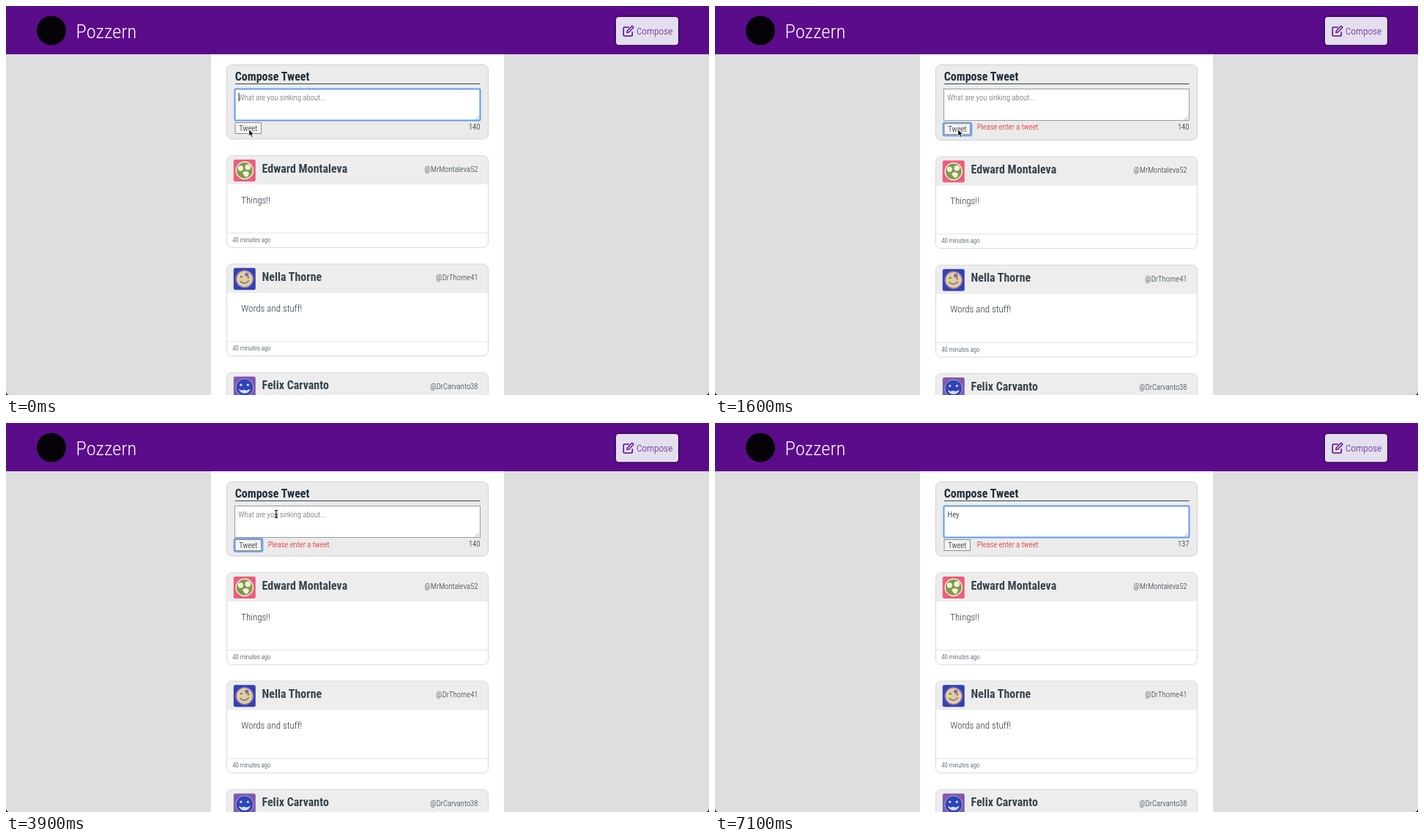
Animation of 960 by 532 pixels, one loop 7200 ms. Source, as an HTML page:

```html
<!DOCTYPE html>
<html lang="en">
<head>
<meta charset="utf-8">
<title>Pozzern</title>
<style>
  html, body { margin: 0; width: 100%; height: 100%; overflow: hidden; background: #dedede; }
  svg { display: block; width: 960px; height: 532px; }
  text { font-family: "Roboto Condensed", Roboto, sans-serif; font-stretch: 75%; font-weight: 350; white-space: pre; }
  text.wide { font-family: Roboto, sans-serif; font-stretch: 100%; }
  .bold { font-weight: 700; }
  .reg { font-weight: 400; }
  .raised { filter: drop-shadow(0 0.5px 1.5px #000); }
</style>
</head>
<body>
<svg id="stage" viewBox="0 0 960 532" xmlns="http://www.w3.org/2000/svg"></svg>
<script>
const NS = 'http://www.w3.org/2000/svg';
const stage = document.getElementById('stage');
const LOOP = 7200, STEP = 100;
const INK = '#36454f', DARK = '#25333e', PURPLE = '#5b0c8b', BLUE = '#5e9ced';

function add(parent, tag, attrs) {
  const el = document.createElementNS(NS, tag);
  for (const key in attrs) el.setAttribute(key, attrs[key]);
  parent.appendChild(el);
  return el;
}
const group = (parent, attrs = {}) => add(parent, 'g', attrs);
const rect = (parent, x, y, width, height, fill, more = {}) =>
  add(parent, 'rect', { x, y, width, height, fill, ...more });
const circle = (parent, cx, cy, r, fill, more = {}) =>
  add(parent, 'circle', { cx, cy, r, fill, ...more });
const path = (parent, d, fill, more = {}) => add(parent, 'path', { d, fill, ...more });

// Narrow the plain face only when no condensed face is installed.
function condenseRatio() {
  const width = cls => {
    const el = add(stage, 'text', { class: cls, 'font-size': 40 });
    el.textContent = 'Condensed sample';
    const w = el.getComputedTextLength();
    el.remove();
    return w;
  };
  return width('') / width('wide') > 0.95 ? 0.88 : 1;
}
const narrow = condenseRatio();

function text(parent, str, x, y, size, fill, cls = '', anchor = 'start') {
  const el = add(parent, 'text', {
    transform: `translate(${x} ${y}) scale(${narrow} 1)`,
    'font-size': size, fill, class: cls, 'text-anchor': anchor
  });
  el.textContent = str;
  return el;
}
const show = (el, on) => el.setAttribute('visibility', on ? 'visible' : 'hidden');
const move = (el, x, y) => el.setAttribute('transform', `translate(${x} ${y})`);

// Page
rect(stage, 0, 0, 960, 532, '#dedede');
rect(stage, 280, 66, 400, 466, '#fff');

// Compose form
const card = rect(stage, 301.5, 80.5, 357, 101.5, '#ebebeb', { rx: 7, stroke: '#d0d0d0' });
text(stage, 'Compose Tweet', 312.7, 102.3, 16, '#1f2c39', 'bold');
rect(stage, 313, 106, 334.5, 1, '#36454f');
rect(stage, 312.5, 113.5, 335, 43, '#fff', { stroke: '#9a9a9a' });
const boxRing = rect(stage, 312.5, 113.5, 335, 43, 'none', { stroke: BLUE, 'stroke-width': 2, rx: 1 });
path(stage, 'M641 155.5l5-5M644 155.5l2-2', 'none', { stroke: '#777', 'stroke-width': 0.7 });
const hint = text(stage, 'What are you sinking about...', 317.3, 128.5, 10.67, '#5c5c5c');
const typed = text(stage, '', 317.6, 128.5, 10.67, '#000');
const caret = rect(stage, 0, 118.5, 0.9, 12, '#111');

const button = group(stage);
const buttonRing = rect(button, 312, 158.6, 38, 17, 'none', { stroke: '#78a9ea', 'stroke-width': 3, rx: 2 });
rect(button, 313, 159.5, 35.5, 15, '#f3f3f3', { stroke: '#858585', 'stroke-width': 0.9 });
text(button, 'Tweet', 318.2, 170.6, 10.67, '#111');

const clip = add(add(stage, 'clipPath', { id: 'slide' }), 'rect', { x: 350, y: 160, width: 110, height: 0 });
const errorBox = group(stage, { 'clip-path': 'url(#slide)' });
const error = group(errorBox);
text(error, 'Please enter a tweet', 357.8, 0, 10.67, '#e00d15');
const count = text(stage, '140', 647.5, 169.3, 10.67, '#111', '', 'end');

// Feed
const faces = [
  g => {
    rect(g, 0, 0, 30, 30, '#ee5c7c', { rx: 2.5 });
    circle(g, 15, 15, 12.3, '#f4f0dc');
    circle(g, 15, 15, 10.8, '#7f9a4b');
    circle(g, 9.5, 12, 3.6, '#f4f0dc');
    circle(g, 19.5, 10.5, 3.8, '#f4f0dc');
    path(g, 'M12 18q5-4 9 0q0 5-4 6q-3-2-5-6z', '#f4f0dc');
  },
  g => {
    rect(g, 0, 0, 30, 30, '#3440b4', { rx: 2.5 });
    circle(g, 15, 15, 11.6, '#dfcf9b', { stroke: '#8a74b4', 'stroke-width': 1.6 });
    circle(g, 10.5, 12, 1.3, '#6d5a86');
    circle(g, 18, 9, 2.6, '#8a64ad');
    circle(g, 20, 13, 1.2, '#6d5a86');
    path(g, 'M9 18q6 6 12-1', 'none', { stroke: '#6d5a86', 'stroke-width': 1.3 });
  },
  g => {
    rect(g, 0, 0, 30, 30, '#8258ae', { rx: 2.5 });
    circle(g, 15, 15, 12, '#2c45b7', { stroke: '#b9a5d4', 'stroke-width': 1 });
    circle(g, 10, 11.5, 1.6, '#d9dcf2');
    circle(g, 19.5, 11.5, 1.6, '#d9dcf2');
    path(g, 'M7 17l4 2 3-1 4 1 5-2q-2 6-8 6t-8-6z', '#d9dcf2');
  }
];
const feed = group(stage);
const posts = [
  ['Edward Montaleva', '@MrMontaleva52', 'Things!!'],
  ['Nella Thorne', '@DrThorne41', 'Words and stuff!'],
  ['Felix Carvanto', '@DrCarvanto38', '']
];
posts.forEach(([name, handle, body], i) => {
  const g = group(feed, { transform: `translate(0 ${204.5 + i * 148.4})` });
  rect(g, 301.5, 0, 357, 125.8, '#fff', { rx: 7 });
  path(g, 'M301.5 39.5V7q0-7 7-7h343q7 0 7 7v32.5z', '#ededed');
  rect(g, 302, 105.5, 356, 1, '#e3e3e3');
  rect(g, 301.5, 0, 357, 125.8, 'none', { rx: 7, stroke: '#d9d9d9' });
  faces[i](group(g, { transform: 'translate(310.8 5.4)' }));
  text(g, name, 349.5, 23, 16, INK, 'bold');
  text(g, handle, 644.5, 22.3, 10.67, DARK, '', 'end');
  text(g, body, 321.2, 65, 13, DARK);
  text(g, '40 minutes ago', 309.3, 118.4, 8.67, DARK);
});

// Top bar
rect(stage, 0, 0, 960, 66, PURPLE);
circle(stage, 62, 33.5, 20, '#050308');
text(stage, 'Pozzern', 95.5, 44, 26.67, '#fff');
rect(stage, 833, 15, 85, 38.3, '#e3dfee', { rx: 4, class: 'raised' });
const pen = { stroke: PURPLE, 'stroke-width': 1.6, 'stroke-linejoin': 'round', 'stroke-linecap': 'round' };
path(stage, 'M850.5 29h-6q-1.2 0-1.2 1.2v9.6q0 1.2 1.2 1.2h9.6q1.2 0 1.2-1.2v-4', 'none', pen);
path(stage, 'M848 36.5l.4-2.6 6.6-6.6 2 2-6.6 6.6z', 'none', { ...pen, 'stroke-width': 1.4 });
text(stage, 'Compose', 861, 39, 13.33, PURPLE);

// Rounded window corners
path(stage, 'M0 527v5h5q-5 0-5-5zM960 527v5h-5q5 0 5-5z', '#000');

// Pointers
const arrow = path(stage, 'M0 0v9.2l2.1-1.9 1.5 3.4 1.7-.7-1.5-3.3h3z', '#000',
  { stroke: '#fff', 'stroke-width': 0.8 });
const beam = path(stage, 'M-2.2-5.2q2.2 0 2.2 1.5v7.4q0 1.5-2.2 1.5M2.2-5.2q-2.2 0-2.2 1.5v7.4q0 1.5 2.2 1.5M-1.2 1h2.4',
  'none', { stroke: '#111', 'stroke-width': 1.1 });

// Timeline
const PRESS = 500, SLIDE = 1300, SLID = 1800, FOCUS = 4700;
const track = [[0, 331.8, 168.8], [3400, 331.8, 168.8], [3800, 365, 127], [3900, 369, 124.5], [4500, 409, 125.3]];
const keys = [[5800, 'H'], [6200, 'He'], [6500, 'Hey']];

function pointerAt(t) {
  for (let i = 1; i < track.length; i++) {
    const [t0, x0, y0] = track[i - 1], [t1, x1, y1] = track[i];
    if (t < t1) {
      const k = (t - t0) / (t1 - t0);
      return [x0 + (x1 - x0) * k, y0 + (y1 - y0) * k];
    }
  }
  return track[track.length - 1].slice(1);
}

function draw(t) {
  const boxFocus = t < PRESS || t >= FOCUS;
  show(boxRing, boxFocus);
  show(buttonRing, !boxFocus);

  const sliding = t >= SLIDE && t < SLID;
  const k = Math.min(1, Math.max(0, (t - SLIDE) / 400));
  clip.setAttribute('height', 14 * (0.5 - Math.cos(k * Math.PI) / 2));
  show(errorBox, t >= SLIDE);
  move(error, 0, sliding ? 169.3 : 170.4);
  move(button, 0, sliding ? 1.3 : 0);
  move(feed, 0, sliding ? 1.4 : 0);
  card.setAttribute('height', sliding ? 102.9 : 101.5);

  const [start, str] = keys.filter(key => key[0] <= t).pop() || [t < PRESS ? 0 : FOCUS, ''];
  typed.textContent = str;
  count.textContent = 140 - str.length;
  show(hint, !str);
  const end = str ? typed.getComputedTextLength() * narrow : 0;
  caret.setAttribute('x', 317.6 + end);
  show(caret, boxFocus && Math.floor((t - start) / 500) % 2 === 0);

  const [x, y] = pointerAt(t);
  const inBox = y < 157;
  move(arrow, x, y);
  move(beam, x, y);
  show(arrow, !inBox);
  show(beam, inBox && !str);
}

const begin = performance.now();
function tick() {
  const t = (performance.now() - begin) % LOOP;
  draw(Math.floor(t / STEP) * STEP);
  requestAnimationFrame(tick);
}
draw(0);
requestAnimationFrame(tick);
</script>
</body>
</html>
```
